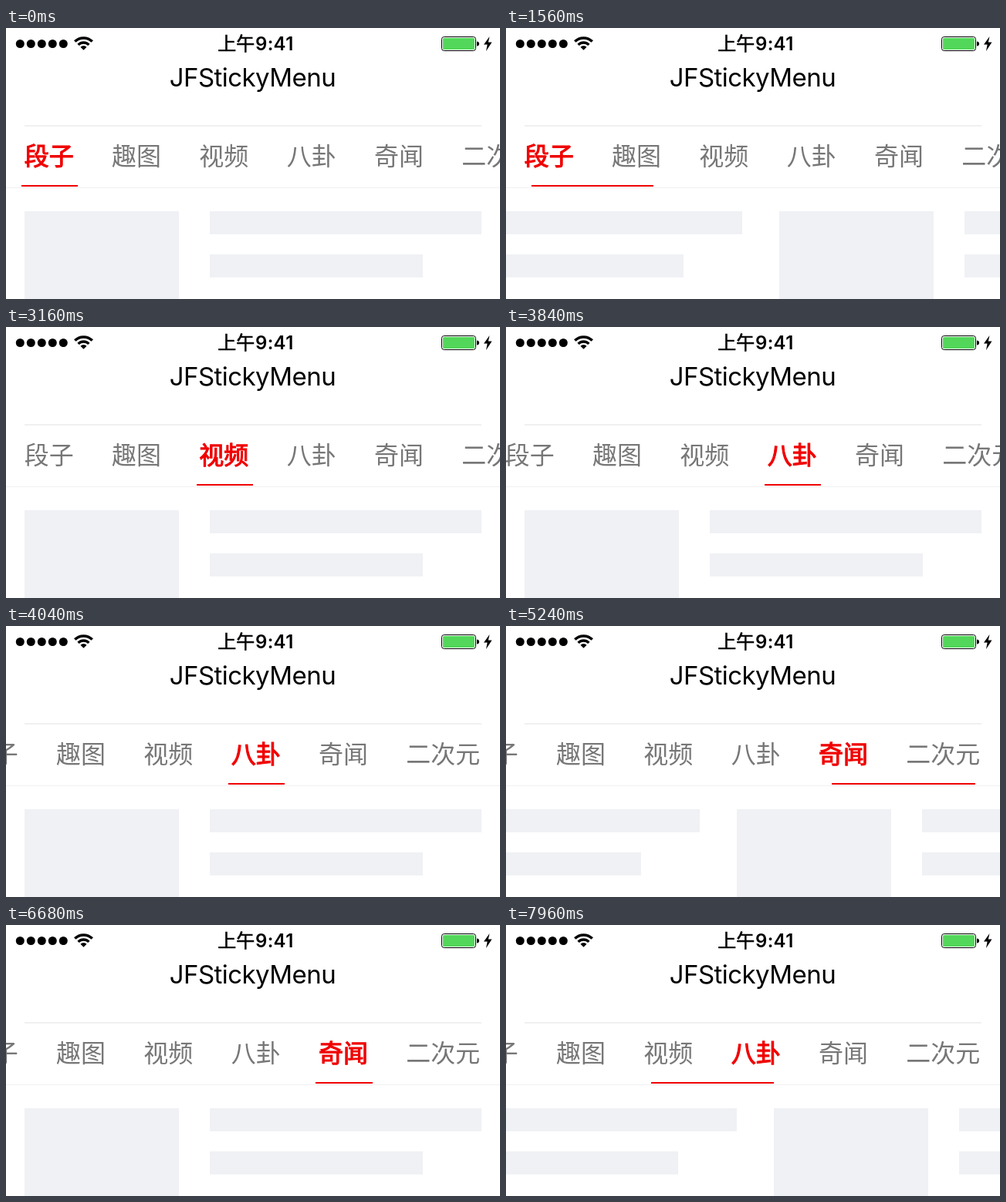
An HTML page for the animation above (8 s loop, 640x352 px).

```html
<!DOCTYPE html>
<html lang="zh-CN">
<head>
<meta charset="utf-8">
<title>JFStickyMenu</title>
<style>
  html, body { margin: 0; width: 100%; height: 100%; overflow: hidden; background: #fff; }
  svg { display: block; width: 640px; height: 352px; }
  text { font-family: Inter, "Noto Sans CJK SC", "Noto Sans CJK", sans-serif; }
  .time { font-size: 24px; font-weight: 600; letter-spacing: .3px; }
  .noon { font-size: 24px; font-weight: 400; stroke: #000; stroke-width: .6px; }
  .title { font-size: 33px; letter-spacing: -.55px; text-anchor: middle; }
  .tab { font-family: "Noto Sans CJK SC", "Noto Sans CJK", sans-serif; font-size: 32px; fill: #777; text-anchor: middle; }
  .tab.on { fill: #f00000; stroke: #f00000; stroke-width: 1.1px; }
</style>
</head>
<body>
<svg viewBox="0 0 640 352">
  <rect width="640" height="352" fill="#fff"/>
  <g id="dots"></g>
  <g fill="none" stroke="#000">
    <path d="M89.3 17.6A15.8 15.8 0 0 1 111.7 17.6" stroke-width="3.6"/>
    <path d="M93.6 21.9A9.8 9.8 0 0 1 107.4 21.9" stroke-width="3.4"/>
    <rect x="564.5" y="11.5" width="44" height="18" rx="3"/>
  </g>
  <path d="M100.5 28.8L96.5 24.8A5.6 5.6 0 0 1 104.5 24.8Z"/>
  <rect x="566" y="13" width="41" height="15" rx="1.5" fill="#53d75a"/>
  <path d="M610 17.5Q613 17.5 613 20.5T610 23.5Z"/>
  <path d="M626.5 11L619 21.5H623.6L622 30L629.5 18.5H624.8Z"/>
  <text class="noon" x="274.2" y="29">上午</text>
  <text class="time" x="323" y="29">9:41</text>
  <text class="title" x="319.4" y="76">JFStickyMenu</text>
  <rect x="24" y="126" width="592" height="2" fill="#f0f0f0"/>
  <rect y="207" width="640" height="1" fill="#f0f0f0"/>
  <g id="menu"></g>
  <rect id="line" y="204" height="2" fill="#f00000"/>
  <g id="pages" fill="#f0f1f5"></g>
</svg>
<script>
const LOOP = 8000, PAGE = 640, PITCH = 113.33, MENU_SHIFT = 72;
const labels = ['段子', '趣图', '视频', '八卦', '奇闻', '二次元'];
// swipes: start, duration, from page, to page
const swipes = [
  [1427, 490, 0, 1],
  [2160, 670, 1, 2],
  [3190, 510, 2, 3],
  [4200, 620, 3, 4],
  [5069, 530, 4, 5],
  [5860, 770, 5, 4],
  [7070, 480, 4, 3],
  [7821, 490, 3, 2]
];

const $ = id => document.getElementById(id);
function add(parent, tag, attrs, text = '') {
  const el = document.createElementNS('http://www.w3.org/2000/svg', tag);
  for (const k in attrs) el.setAttribute(k, attrs[k]);
  el.textContent = text;
  return parent.appendChild(el);
}

for (let i = 0; i < 5; i++) add($('dots'), 'circle', { cx: 18.3 + 14 * i, cy: 20.5, r: 5.5 });

const items = labels.map((label, i) => {
  const x = 24 + PITCH * i, width = label.length * 32 + 1.3;
  return {
    left: x - 4,
    right: x + width + 4,
    el: add($('menu'), 'text', { class: 'tab', x: x + width / 2 - 1, y: 178 }, label)
  };
});

labels.forEach((_, i) => {
  const bar = (x, y, width, height) => add($('pages'), 'rect', { x: PAGE * i + x, y, width, height });
  bar(24, 238, 200, 114);
  bar(264, 238, 352, 30);
  bar(264, 294, 276, 30);
});

const clamp = v => Math.min(1, Math.max(0, v));
const mix = (a, b, k) => a + (b - a) * k;
const smooth = u => u * u * (3 - 2 * u);
const flick = u => 1 - (1 - u ** 1.25) ** 3;

function draw(t) {
  let pos = 0, active = 0;
  for (const [start, span, from, to] of swipes) {
    if (t < start) break;
    const u = clamp((t - start) / span);
    pos = mix(from, to, flick(u));
    active = u < 1 ? from : to;
  }
  const shift = Math.round(MENU_SHIFT * smooth(clamp((t - 3708) / 332)));

  // the leading edge runs ahead, the trailing edge catches up
  const i = Math.min(Math.floor(pos), labels.length - 2), p = pos - i;
  const a = items[i], b = items[i + 1];
  const left = Math.round(mix(a.left, b.left, p ** 3)) - shift;
  const right = Math.round(mix(a.right, b.right, 1 - (1 - p) ** 3)) - shift;
  $('line').setAttribute('x', left);
  $('line').setAttribute('width', right - left);

  items.forEach((item, n) => item.el.setAttribute('class', n === active ? 'tab on' : 'tab'));
  $('menu').setAttribute('transform', `translate(${-shift} 0)`);
  $('pages').setAttribute('transform', `translate(${-Math.round(pos * PAGE)} 0)`);
}

function tick() {
  draw(performance.now() % LOOP);
  requestAnimationFrame(tick);
}
tick();
</script>
</body>
</html>
```
